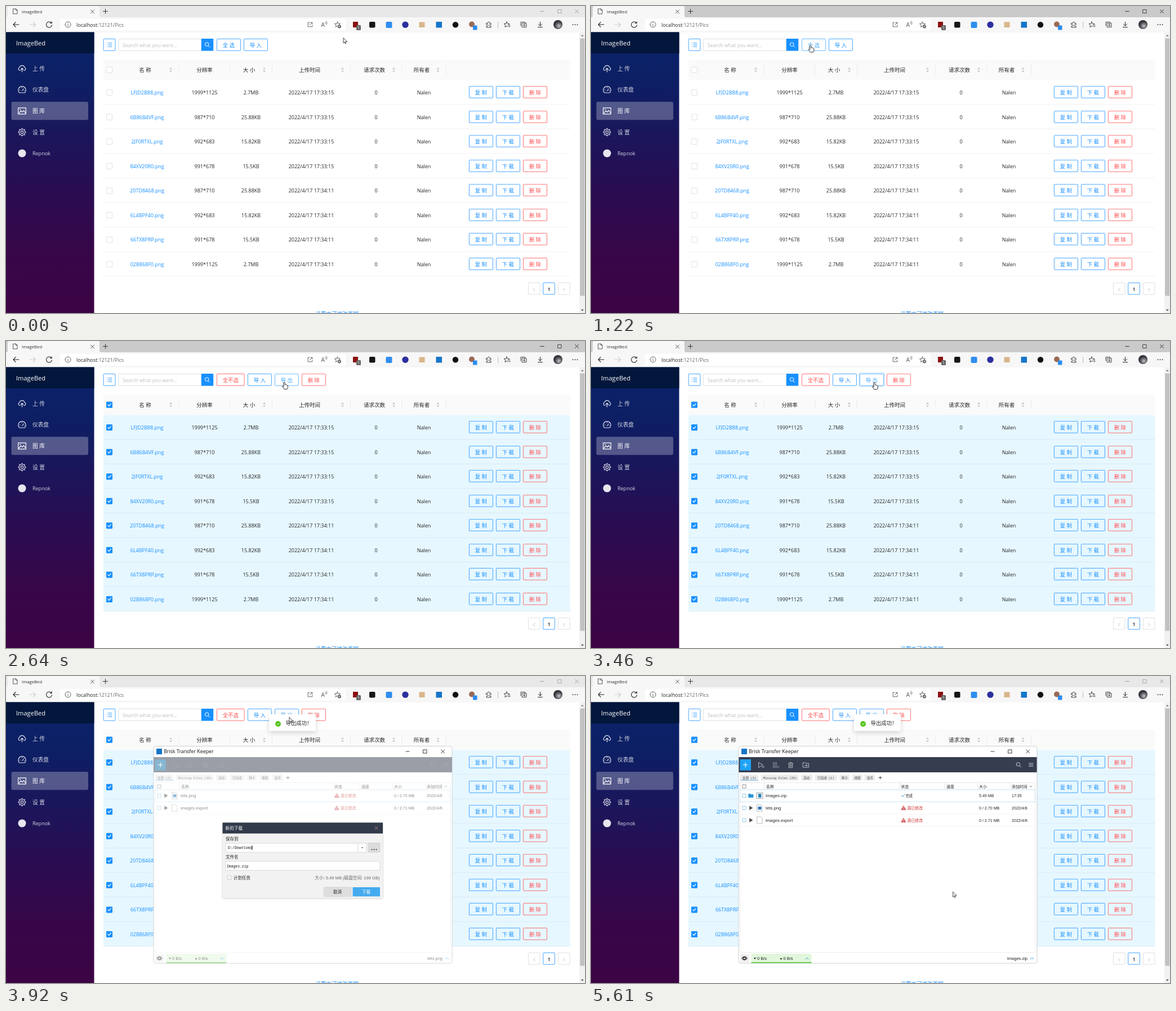
An HTML page for the animation above (5.68 s loop, 1028 px wide and 545 px high).

```html
<!DOCTYPE html>
<html lang="zh-CN">
<head>
<meta charset="utf-8">
<title>ImageBed</title>
<style>
html, body { margin: 0; width: 100%; height: 100%; overflow: hidden; background: #fff; }
svg { display: block; }
text { font-family: "Open Sans", "Noto Sans CJK SC", "Noto Sans CJK", sans-serif; white-space: pre; }
.arial { font-family: "Liberation Sans", "Noto Sans CJK SC", "Noto Sans CJK", sans-serif; }
.mono { font-family: "Liberation Mono", "Noto Sans CJK SC", "Noto Sans CJK", monospace; }
</style>
</head>
<body>
<svg id="stage" width="1028" height="545" viewBox="0 0 1028 545"></svg>
<script>
const LOOP = 5680;
const BLUE = '#1890ff', LIGHT_BLUE = '#40a9ff', RED = '#ff4d4f', LIGHT_RED = '#ff7875', INK = '#262626';
let css = '';

// Keyframes given as [ms, declarations] pairs
function animate(id, frames, ease = 'step-end') {
  const all = [...frames, [LOOP, frames[frames.length - 1][1]]];
  const body = all.map(([ms, rule]) => `${(ms / LOOP * 100).toFixed(3)}%{${rule}}`).join('');
  css += `@keyframes ${id}{${body}}#${id}{animation:${id} ${LOOP}ms ${ease} infinite}`;
}
// Toggle visibility at each given time
function toggle(id, shown, ...times) {
  const vis = on => `visibility:${on ? 'visible' : 'hidden'}`;
  animate(id, [[0, vis(shown)], ...times.map((ms, i) => [ms, vis(shown === (i % 2 === 1))])]);
}
const colors = (id, ...list) => animate(id, list.map(([ms, c]) => [ms, `color:${c}`]));
const fades = (id, ...list) => animate(id, list.map(([ms, o]) => [ms, `opacity:${o}`]), 'linear');

const rect = (x, y, w, h, fill, more = '') =>
  `<rect x="${x}" y="${y}" width="${w}" height="${h}" fill="${fill}" ${more}/>`;
const frame = (x, y, w, h, fill, color) =>
  rect(x + .4, y + .4, w - .8, h - .8, fill, `rx="1" stroke="${color}" stroke-width=".8"`);
const disc = (x, y, r, fill) => `<circle cx="${x}" cy="${y}" r="${r}" fill="${fill}"/>`;
const text = (x, y, s, size, fill = INK, anchor = 'start', more = '') =>
  `<text x="${x}" y="${y}" font-size="${size}" fill="${fill}" text-anchor="${anchor}" ${more}>${s}</text>`;
const mid = (x, y, s, size, fill, more) => text(x, y, s, size, fill, 'middle', more);
const arial = (x, y, s, size = 7.1, fill = '#222', anchor) => text(x, y, s, size, fill, anchor, 'class="arial"');
const mono = (x, y, s, size, fill = '#333') => text(x, y, s, size, fill, 'start', 'class="mono"');
const icon = (x, y, d, color = '#333', w = 1, fill = 'none') =>
  `<path transform="translate(${x} ${y})" d="${d}" stroke="${color}" stroke-width="${w}" fill="${fill}" stroke-linecap="round" stroke-linejoin="round"/>`;
const group = (id, ...parts) => `<g id="${id}">${parts.join('')}</g>`;

const X = 'M-3 -3L3 3M3 -3L-3 3', SQUARE = 'M-3 -3H3V3H-3Z', PLUS = 'M-4 0H4M0 -4V4';
const UP = 'M-2.5 1.3L0 -1.3 2.5 1.3';
const CHECK = 'M-2.6 0L-.8 2 2.8 -2.2', LENS = 'M2 2L4.3 4.3M-4 -.7a3.3 3.3 0 1 0 6.6 0a3.3 3.3 0 1 0 -6.6 0';
const STAR = 'M0 -5L1.4 -1.7 5 -1.4 2.3 1 3.1 4.5 0 2.6 -3.1 4.5 -2.3 1 -5 -1.4 -1.4 -1.7Z';
const PAGE = 'M-3.5 -4.5H1L3.5 -2V4.5H-3.5ZM1 -4.5V-2H3.5';

function button(x, y, w, label, color, id = '') {
  return `<g ${id && `id="${id}"`} style="color:${color}">` +
    frame(x, y, w, 21.6, 'none', 'currentColor') +
    mid(x + w / 2, y + 14.6, label, 9.4, 'currentColor') + '</g>';
}

function browser() {
  const bar = [
    rect(0, 0, 1028, 21, 'currentColor'),
    `<path d="M0 20.5Q3 20 3 16V3Q3 0 6 0H163Q166 0 166 3V16Q166 20 170 20.5Z" fill="#f7f7f7"/>`,
    icon(16.5, 9.5, PAGE, '#444', .9), text(28, 12.7, 'ImageBed', 7.7, '#333'),
    icon(153.5, 10, X, '#444', .9), icon(176.5, 9.5, PLUS, '#333', 1),
  ];
  const controls = [icon(952, 9.5, 'M-3.3 0H3.3', 'currentColor', .9),
    icon(983, 9.5, SQUARE, 'currentColor', .8), icon(1013.5, 9.5, X, 'currentColor', .9)];
  return group('strip', ...bar) + group('controls', ...controls) +
    rect(0, 20, 1028, 27, '#f7f7f7') + rect(96, 23, 507, 20.5, '#fff', 'rx="3"') +
    icon(18, 33, 'M5 0H-5M-.8 -4.4L-5 0 -.8 4.4', '#222', 1.1) +
    icon(47.5, 33, 'M-5 0H5M.8 -4.4L5 0 .8 4.4', '#ccc', 1.1) +
    icon(76.5, 33, 'M4 -3A5 5 0 1 0 5 .8M4.7 -5.3V-2.5H1.8', '#222', 1.1) +
    icon(110, 33, 'M-5 0a5 5 0 1 0 10 0a5 5 0 1 0 -10 0M0 -.5V2.5M0 -2.5V-2.4', '#555', .9) +
    text(125, 36.5, 'localhost<tspan fill="#666">:12121/Pics</tspan>', 8.85, '#222') +
    icon(540, 33, 'M-1 -3.8H-3.8V3.8H3.8V1M1 -3.8H3.8V-1M3.8 -3.8L-.5 .5', '#555', .9) +
    text(559.5, 37, 'A', 10, '#555') + icon(568, 30, 'M-1 -2Q1 0 -1 2M1 -3.3Q3.3 0 1 3.3', '#555', .7) +
    icon(588.5, 33, STAR, '#555', .9) + disc(592, 36.5, 3, '#555') + icon(592, 36.5, 'M-1.5 0H1.5M0 -1.5V1.5', '#fff', .7) +
    rect(616, 28, 9, 10, '#8c1010') + rect(622, 34, 8, 9, '#666', 'rx="1.5"') + mid(626, 41.3, '1', 7.5, '#fff') +
    rect(645, 28, 10.5, 10.5, '#151515', 'rx="2"') + rect(674.5, 28, 11, 11, '#2f8df0', 'rx="2"') +
    disc(709, 33.2, 5.7, '#2c2f9e') + rect(733.5, 28.5, 10, 9.5, '#d9b68a') +
    rect(763.5, 28, 10.5, 10.5, '#1675c8') + disc(798, 33.3, 5.2, '#111') +
    disc(827, 32.5, 5, '#9b6a55') + rect(829, 34.5, 7.5, 8, '#2d8cf0', 'rx="1"') +
    icon(857, 33.5, 'M-4 -3H-1.4A1.6 1.6 0 1 1 1.4 -3H4V0A1.6 1.6 0 1 0 4 2V4.5H-4V2A1.7 1.7 0 1 0 -4 -.6Z', '#333', .9) +
    rect(873, 28, 1, 11, '#bbb') +
    icon(889, 33, STAR, '#333', .9) + rect(890.5, 33, 5, 5.5, '#f7f7f7') + icon(892, 34, 'M-1 0H3M0 2.5H3', '#333', .9) +
    icon(919, 33, 'M-5 2V-4.5H2.5V-2.3M-2.5 -2.3H5V4.5H-2.5ZM1.2 -.9V3.1M-.8 1.1H3.2', '#333', .9) +
    icon(948.5, 33, 'M0 -4.7V2M-3.2 -1L0 2.2 3.2 -1M-4 4.6H4', '#222', 1) +
    disc(980, 33, 8, 'url(#face)') + [1006.5, 1010.5, 1014.5].map(x => disc(x, 33.2, .9, '#222')).join('');
}

function sidebar() {
  const labels = ['上 传', '仪表盘', '图 库', '设 置', 'Repnok'];
  const gear = Array.from({ length: 8 }, (_, i) => {
    const a = i * Math.PI / 4, p = r => `${(Math.cos(a) * r).toFixed(2)} ${(Math.sin(a) * r).toFixed(2)}`;
    return `M${p(5.4)}L${p(7)}`;
  }).join('');
  return rect(0, 46.5, 156.5, 499, 'url(#side)') + rect(0, 46.5, 156.5, 37.5, '#03163b') +
    text(18, 70.3, 'ImageBed', 11.1, '#fff') +
    rect(9.5, 170, 136.5, 32.3, '#fff', 'rx="3" opacity=".27"') +
    labels.map((s, i) => text(47, 114.8 + i * 37.6, s, i === 4 ? 9 : 9.7, i === 2 ? '#fff' : '#d5d6e2')).join('') +
    icon(28.5, 111, 'M-3 3.5H-4A3 3 0 0 1 -4.4 -2.2A4.6 4.6 0 0 1 4.4 -2.2A3 3 0 0 1 4 3.5H3M0 6V-.5M-2.2 1.5L0 -.7 2.2 1.5', '#e6e6ee', 1.2) +
    icon(28.5, 149, 'M-4.7 5A6.7 6.7 0 1 1 4.7 5ZM0 1.5L2.8 -2M-4.2 0H-3.5M0 -4.3V-3.8M3.6 1H4.2', '#e6e6ee', 1.2) +
    icon(28.5, 186.3, 'M-6.8 -5.5H6.8V5.5H-6.8ZM-5.5 3.8L-2 -.3 .5 2 3 -.8 5.8 3M-4 -2.6H-3', '#fff', 1.2) +
    icon(28.5, 224, 'M-5.4 0a5.4 5.4 0 1 0 10.8 0a5.4 5.4 0 1 0 -10.8 0M-2.3 0a2.3 2.3 0 1 0 4.6 0a2.3 2.3 0 1 0 -4.6 0' + gear, '#e6e6ee', 1.2) +
    disc(28.5, 261.5, 7, '#e6e6ee');
}

const FILES = ['LFJD2B88', '6B86B4VF', '2JF0RTXL', '84XV20R0', '20TD8468', '6L4BPF40', '66TX8PRP', '02B868F0'];
const KINDS = [['1999*1125', '2.7MB'], ['987*710', '25.88KB'], ['992*683', '15.82KB'], ['991*678', '15.5KB']];
const PITCH = 43.55;
const rowY = i => 131.6 + i * PITCH;
const boxYs = [113.3, ...FILES.map((_, i) => rowY(i) + 22)];

function table() {
  const heads = [[247, '名 称', 292.5], [352.5, '分辨率'], [431.5, '大 小', 458.5], [539, '上传时间', 597.5],
    [654, '请求次数', 688.5], [738, '所有者', 767]];
  const rows = FILES.map((name, i) => {
    const y = rowY(i), [dim, size] = KINDS[i === 7 ? 0 : i < 4 ? i : i - 3];
    const cells = [[352.5, dim], [435, size], [542, `2022/4/17 17:${i < 4 ? '33:15' : '34:11'}`], [657, 0], [742, 'Nalen']];
    const by = Math.round(y + 10.4);
    return rect(173, y + PITCH - .9, 828.5, .9, '#000', 'opacity=".06"') +
      mid(250.5, y + 25.4, name + '.png', 9, BLUE) +
      cells.map(([x, s]) => mid(x, y + 25.4, s, 9, INK)).join('') +
      button(822, by, 42.8, '复 制', BLUE) + button(870, by, 42.8, '下 载', BLUE) + button(918, by, 42.8, '删 除', RED);
  });
  return rect(173, 95, 828.5, 36.6, '#fafafa') +
    group('rowsOn', rect(173, 131.6, 828.5, PITCH * 8, '#e6f7ff')) +
    [306, 397, 472, 611, 702, 781].map(x => rect(x, 104, 1, 18, '#ebebeb')).join('') +
    heads.map(([x, s, sort]) => mid(x, 116.9, s, 9.5, INK) + (sort ?
      icon(sort, 113.3, 'M-2.5 -1.2L0 -4 2.5 -1.2ZM-2.5 1.2L0 4 2.5 1.2Z', 'none', 0, '#bfbfbf') : '')).join('') +
    rows.join('') +
    boxYs.map(y => frame(178, y - 5.5, 11, 11, '#fff', '#d9d9d9')).join('') +
    group('ticks', ...boxYs.map(y => rect(178, y - 5.5, 11, 11, BLUE, 'rx="1.3"') + icon(183.5, y, CHECK, '#fff', 1.2)));
}

function page() {
  return frame(172.8, 58, 21.6, 21.6, 'none', BLUE) +
    icon(183.7, 69, 'M-1.8 -3.2H4.3M-1.8 0H4.3M-1.8 3.2H4.3M-4.2 -3.2H-4M-4.2 0H-4M-4.2 3.2H-4', BLUE, .9) +
    group('field', frame(199, 58, 148.5, 21.6, '#fff', 'currentColor')) +
    text(207, 72.6, 'Search what you want...', 8.8, '#bfbfbf') +
    rect(346.8, 58, 21.4, 21.6, BLUE) + icon(357.3, 68.8, LENS, '#fff', 1) +
    group('plain', button(374, 58, 42.8, '全 选', BLUE, 'all'), button(422, 58, 42.8, '导 入', BLUE)) +
    group('picked', button(374, 58, 49.5, '全不选', RED, 'none'), button(429, 58, 42.8, '导 入', BLUE, 'load'),
      rect(476, 57, 44.8, 23.6, 'none', `id="wave" rx="2" stroke="${BLUE}" stroke-width="2"`),
      button(477, 58, 42.8, '导 出', BLUE, 'save'), button(525, 58, 42.8, '删 除', RED)) +
    table() +
    [927, 980].map(x => frame(x, 491, 21.4, 21.4, '#fff', '#d9d9d9')).join('') +
    frame(953.3, 491, 21.4, 21.4, '#fff', BLUE) + mid(964, 505.5, '1', 9, '#222', 'font-weight="600"') +
    icon(937.5, 503.5, 'M1.6 -2.4L-1.6 0 1.6 2.4', '#c4c4c4', .9) + icon(991, 503.5, 'M-1.6 -2.4L1.6 0 -1.6 2.4', '#c4c4c4', .9) +
    mid(587.5, 550.3, '设置中可修改页脚', 9.6, BLUE) +
    rect(1018, 46.5, 10, 499, '#f1f1f1') + rect(1019.3, 57.5, 8, 457, '#c1c1c1') +
    icon(1023.3, 52.5, 'M-2.4 1.3L0 -1.6 2.4 1.3Z', 'none', 0, '#777') + icon(1023.3, 540, 'M-2.4 -1.3L0 1.6 2.4 -1.3Z', 'none', 0, '#444');
}

function toast() {
  return group('toast', rect(467, 67.8, 83, 29.4, '#fff', 'rx="1" filter="url(#soft)"'),
    disc(483, 85, 4.9, '#52c41a'), icon(483, 85, 'M-1.9 0L-.5 1.4 2 -1.4', '#fff', 1), text(496.5, 86.6, '导出成功！', 9.4));
}

// Download list with its tabs; statusX is the left edge of the status column
function downloads(id, tabs, statusX, files, footer) {
  const tabRow = tabs.map(([x, w, s], i) => rect(x, 175.5, w, 10, '#ebebeb') +
    (i ? '' : rect(x, 184.6, w, 1.2, '#7fbde8')) + mono(x + 4, 182.8, s, 5.5, '#444'));
  const last = tabs[tabs.length - 1];
  const rows = files.map(([name, kind, size, date], i) => {
    const y = 212.4 + i * 21.8, done = kind === 'zip';
    return (i ? rect(264.5, y + 10.7, 524, .7, '#eee') : rect(264.5, 202, 524, 21.4, '#fff', 'stroke="#c4e2f4" stroke-width=".9"')) +
      rect(269, y - 3, 6, 6, '#fff', 'stroke="#7db9dc" stroke-width=".8"') +
      (done ? icon(284, y, 'M-4 -3H-1L0 -2H4V3H-4Z', '#2a94d6', .8, '#2a94d6') : icon(284, y, 'M-2.5 -3.2L3 0 -2.5 3.2Z', '#444', .5, '#444')) +
      (done ? rect(294, y - 5, 11, 10, '#fff', 'stroke="#888" stroke-width=".8"') + rect(297, y - 3.2, 5.5, 6.5, '#2382b8')
        : icon(299.5, y, 'M-4.5 -6H2L4.5 -3.5V6H-4.5Z', '#aaa', .8, '#fff') +
          (kind === 'png' ? rect(296.5, y - 2.5, 6, 5.5, '#2e78b8') : '')) +
      arial(310, y + 2.6, name, 7.7) +
      (done ? icon(statusX + 3.5, y, CHECK, '#2a94d6', 1) + arial(statusX + 8, y + 2.3, '完成', 6.3)
        : icon(statusX + 4.5, y, 'M0 -3.6L4 3.4H-4Z', '#d05c5c', .8, '#d05c5c') + icon(statusX + 4.5, y, 'M0 -1.3V.8M0 2.2V2.3', '#fff', .8) +
          arial(statusX + 11, y + 2.6, '源已修改', 6.9, '#cc3434')) +
      arial(689, y + 2.6, size) + arial(747, y + 2.6, date);
  });
  return group(id, ...tabRow, icon(last[0] + last[1] + 9, 180.5, 'M-2.5 0H2.5M0 -2.5V2.5', '#444', 1),
    rect(264.5, 189.5, 524, 12.5, '#fff', 'stroke="#ddd" stroke-width=".7"'),
    rect(269, 193, 6, 6, '#fff', 'stroke="#777" stroke-width=".8"'),
    ...[307, statusX - 2.5, 628, 686, 744].map(x => rect(x, 190, .8, 12, '#ddd')),
    ...[[311, '名称'], [statusX, '状态'], [631, '速度'], [689, '大小'], [747, '添加时间']].map(([x, s]) => arial(x, 198.6, s, 6.9)),
    icon(781, 196.2, 'M-1.6 -.8L0 .8 1.6 -.8', '#444', .8), ...rows,
    arial(775, 504.2, footer, 7.5, '#222', 'end'));
}

function dialog() {
  const edge = 'stroke="#ccc" stroke-width=".7"';
  return group('dialog', rect(384.5, 260.3, 284.5, 134, '#f2f2f2', 'filter="url(#thin)"'),
    rect(384.5, 260.3, 284.5, 19.3, '#313a4b'), arial(389.5, 272.8, '新的下载', 7.7, '#fff'), icon(657.5, 269.7, X.replace(/3/g, '2.6'), '#b58d8d', .9),
    arial(390, 292.2, '保存到', 7.5), rect(390, 297, 250, 16, '#fff', edge), rect(624.5, 297, .8, 16, '#ccc'),
    icon(632.5, 305, 'M-1.8 -.9H1.8L0 1.1Z', 'none', 0, '#555'), mono(394, 307.4, 'D:/Download', 6.5, '#111'),
    rect(436.5, 301, .9, 8, '#000', 'id="caret"'),
    rect(643, 296.5, 21, 16.5, '#dcdcdc', edge), [649.5, 653.5, 657.5].map(x => disc(x, 308, .9, '#222')).join(''),
    arial(390, 324.4, '文件名', 7.5), rect(390, 329, 274, 16, '#fff', edge), mono(392, 339.6, 'Images.zip', 6.4, '#111'),
    rect(393.5, 354.8, 6, 6, '#fff', 'stroke="#bbb" stroke-width=".7"'), arial(404, 360.5, '计划任务', 7.5),
    arial(663.5, 360.5, '大小: 5.49 MB (磁盘空间: 199 GB)', 7.6, '#666', 'end'),
    rect(564.5, 375, 48.5, 16.3, '#dedede', edge), arial(588.5, 386, '取消', 7.5, '#222', 'middle'),
    group('accept', rect(615.5, 375, 48.5, 16.3, 'currentColor')), arial(639.5, 386, '下载', 7.5, '#fff', 'middle'));
}

function manager() {
  const old = downloads('before',
    [[265, 32, '全部 (2)'], [302, 66.5, 'Missing Files (26)'], [373, 20, '活动'], [398, 26, '已完成'], [427.5, 18, '种子'], [450, 18, '视频'], [473, 18.5, '音乐']],
    583, [['tets.png', 'png', '0 / 2.70 MB', '2022/4/8'], ['images.export', '', '0 / 2.71 MB', '2022/4/8']], 'tets.png');
  const fresh = downloads('after',
    [[265, 32, '全部 (3)'], [302, 66.5, 'Missing Files (25)'], [373, 20, '活动'], [398, 39, '已完成 (1)'], [441, 18, '种子'], [463.5, 18, '视频'], [486, 18.5, '音乐']],
    550.5, [['Images.zip', 'zip', '5.49 MB', '17:35'], ['tets.png', 'png', '0 / 2.70 MB', '2022/4/8'], ['images.export', '', '0 / 2.71 MB', '2022/4/8']], 'Images.zip');
  const tools = group('tools',
    icon(302, 158, 'M-4 -4.5L3 -.5 -4 4.5ZM2.5 2V4.5M4.8 2V4.5', 'currentColor', .9),
    icon(328.5, 158, 'M-4.5 -4.5H-2.8V4.5H-4.5ZM-.5 -4.5H1.2V4.5H-.5ZM3 2V4.5M5 2V4.5', 'currentColor', .5),
    icon(354.5, 158, 'M-4 -3H4M-1.3 -4.7H1.3M-3.2 -3V4.7H3.2V-3M-1 -1V2.7M1 -1V2.7', 'currentColor', .9),
    icon(381.5, 158, 'M-5 -4H-1L0 -3H5V4H-5ZM-2 .7H2.3M.8 -1L2.5 .7 .8 2.3', 'currentColor', .9),
    icon(759, 157.5, LENS, 'currentColor', 1), icon(781.3, 157.7, 'M-3.7 -2.7H3.7M-3.7 0H3.7M-3.7 2.7H3.7', 'currentColor', 1));
  return group('manager', rect(262, 124.5, 530, 385.5, '#fff', 'rx="4" stroke="#c4c4c4" stroke-width=".8"'),
    rect(267, 129, 10, 10, '#1675c8'), text(280, 137.4, 'Brisk Transfer Keeper', 8.9, '#111'),
    icon(713, 134, 'M-3 0H3', '#222', .9), icon(744, 134, SQUARE, '#222', .9), icon(775.5, 134, X, '#222', .9),
    rect(262.4, 144, 529.2, 27, '#363d4f'), tools,
    group('add', rect(264.5, 148, 19.5, 19.5, 'currentColor')), icon(274.2, 157.7, PLUS, '#fff', 1.1),
    rect(264.5, 202, 524.5, 288.5, 'none', 'stroke="#e4e4e4" stroke-width=".7"'),
    old, fresh,
    rect(265, 494, 16, 14.5, '#eee'), icon(272.5, 501.2, 'M-4.6 0Q0 -6 4.6 0Q0 6 -4.6 0M-2 0a2 2 0 1 0 4 0a2 2 0 1 0 -4 0', '#333', 1.2),
    rect(284.5, 493, 107, 16.5, '#e1f6db'), rect(284.5, 508, 107, 1.6, '#55c03a'),
    icon(291, 501.5, 'M-2 -1.6H2L0 1.8Z', 'none', 0, '#333'), arial(295, 504.2, '0 B/s', 7.5),
    icon(337.5, 501.5, 'M-2 1.6H2L0 -1.8Z', 'none', 0, '#333'), arial(341.5, 504.2, '0 B/s', 7.5),
    icon(383.5, 501.5, UP, '#2a94d6', 1), icon(783, 501.5, UP, '#2a94d6', 1),
    group('veil', rect(262.4, 144, 529.2, 365.6, '#fff', 'rx="1" opacity=".5"')),
    dialog());
}

const pointer = group('pointer',
  group('arrow', icon(0, 0, 'M0 0V8.8L2.1 6.9 3.5 10 4.8 9.4 3.4 6.4H6.2Z', '#111', .8, '#fff')),
  group('hand', icon(0, 0, 'M-1.2 1Q0 -.8 1.2 1V4.5Q2.6 3.8 3 5Q4.4 4.4 4.8 5.6Q6.3 5.2 6.3 7V9Q6.2 11 5 12.5H-.2Q-1.4 10.5 -3.6 7.6Q-3.6 5.8 -1.2 7.6Z', '#111', .9, '#fff')));

const defs = `<defs>
<linearGradient id="side" x2="0" y2="1"><stop offset="0" stop-color="#08246a"/><stop offset=".2" stop-color="#0e1e63"/><stop offset=".55" stop-color="#290d52"/><stop offset=".8" stop-color="#380648"/><stop offset="1" stop-color="#3c0444"/></linearGradient>
<radialGradient id="face" cx=".6" cy=".65"><stop offset="0" stop-color="#c9c6cc"/><stop offset=".5" stop-color="#77747c"/><stop offset="1" stop-color="#35323a"/></radialGradient>
<filter id="soft" x="-20%" y="-40%" width="140%" height="200%"><feDropShadow dx="0" dy="3" stdDeviation="4" flood-opacity=".17"/></filter>
<filter id="thin" x="-5%" y="-5%" width="110%" height="110%"><feDropShadow dx="0" dy=".6" stdDeviation="1" flood-opacity=".3"/></filter></defs>`;

const PICK = 1740, WINDOW = 3660, DIALOG = 3790, CLOSE = 5340;
colors('strip', [0, '#e8e8e8'], [70, '#cacaca'], [WINDOW, '#e8e8e8']);
colors('controls', [0, '#999'], [70, '#222'], [WINDOW, '#999']);
colors('field', [0, '#d9d9d9'], [1060, LIGHT_BLUE], [1200, '#d9d9d9']);
colors('all', [0, BLUE], [1200, LIGHT_BLUE]);
colors('none', [0, LIGHT_RED], [2430, RED]);
colors('load', [0, BLUE], [2430, LIGHT_BLUE], [2540, BLUE]);
colors('save', [0, BLUE], [2570, LIGHT_BLUE], [WINDOW, BLUE]);
colors('accept', [0, '#45abee'], [4680, '#69bff3']);
colors('tools', [0, '#4a5262'], [CLOSE, '#c9ccd4']);
colors('add', [0, '#0c6ca3'], [CLOSE, '#1fa3f8']);
toggle('plain', true, PICK);
toggle('picked', false, PICK);
fades('rowsOn', [0, 0], [PICK - 1, 0], [PICK, .2], [2040, 1]);
fades('ticks', [0, 0], [PICK - 1, 0], [PICK, .4], [1900, 1]);
fades('wave', [0, 0], [3039, 0], [3040, .45], [3250, .2], [3460, .2], [3600, 0]);
animate('toast', [[0, 'opacity:0;transform:translateY(-24px)'], [3460, 'opacity:0;transform:translateY(-24px)'], [3740, 'opacity:1;transform:translateY(0)']], 'linear');
toggle('manager', false, WINDOW);
toggle('before', false, WINDOW, 5410);
toggle('after', false, 5410);
toggle('veil', false, 3730, CLOSE);
toggle('dialog', false, DIALOG, CLOSE);
toggle('caret', false, DIALOG, 4320, 4850, CLOSE);
toggle('arrow', true, 1170, 3600, 4680, CLOSE);
toggle('hand', false, 1170, 3600, 4680, CLOSE);
animate('pointer', [
  [0, 599, 57], [400, 599, 57], [450, 586, 60], [590, 470, 67], [730, 340, 59], [870, 250, 47], [990, 226, 46],
  [1060, 260, 62], [1130, 335, 69], [1220, 389.5, 69.5], [1480, 394, 69.5], [2290, 394, 69.5],
  [2360, 403, 70], [2500, 460, 72], [2640, 494, 73], [2770, 503, 73.5], [3990, 503, 73.5],
  [4050, 508, 72], [4190, 543, 92], [4330, 594, 208], [4470, 630, 335], [4610, 642, 379], [4680, 642.5, 383.5],
].map(([ms, x, y]) => [ms, `transform:translate(${x}px,${y}px)`]), 'linear');

document.getElementById('stage').innerHTML = defs + browser() + sidebar() + page() + manager() + toast() + pointer;
document.head.appendChild(document.createElement('style')).textContent = css;
</script>
</body>
</html>
```
